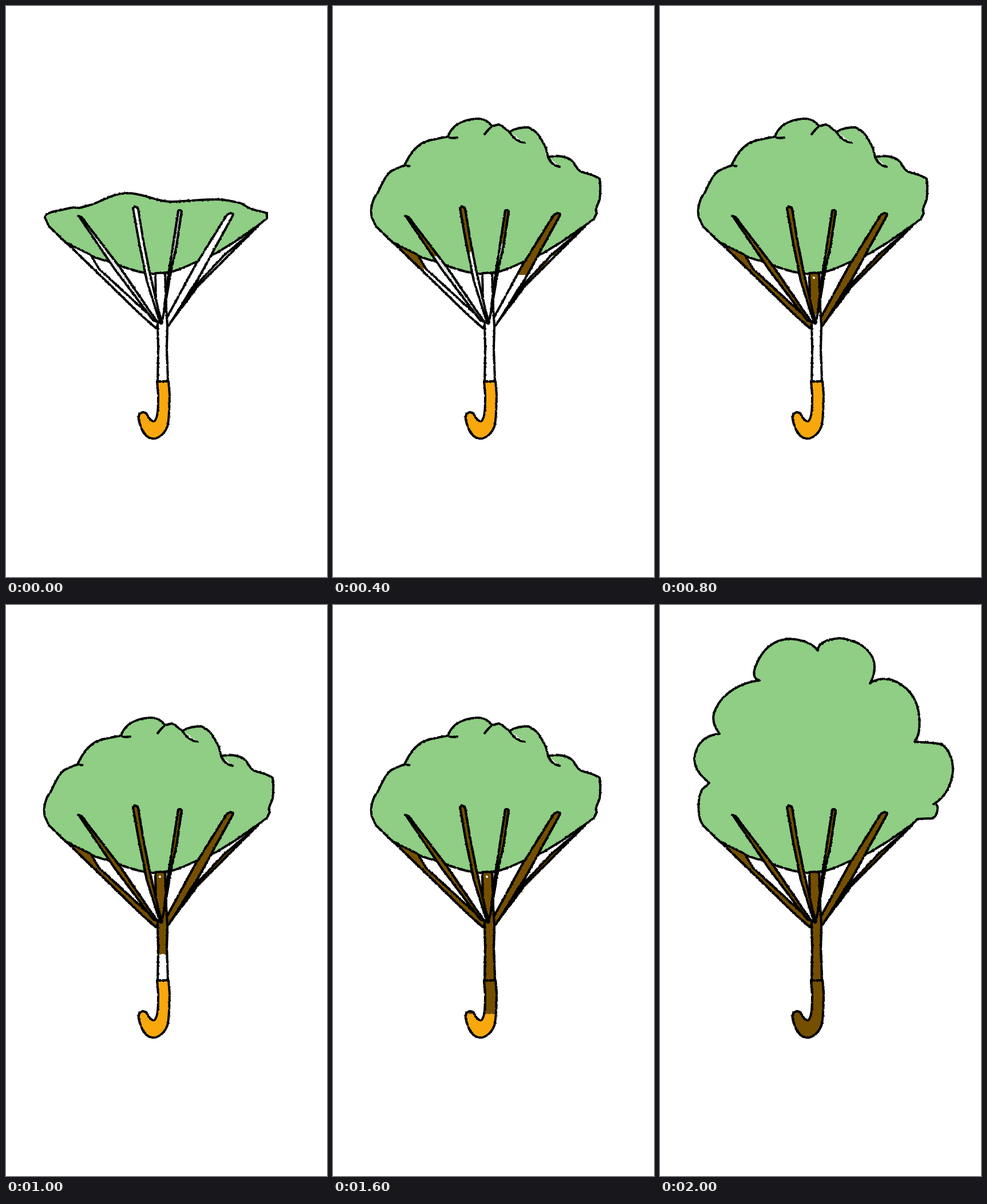
Recreate the animation shown at these times as an HTML page without scripts. Size 561 by 998 pixels, loop 2.4 s.

```html
<!DOCTYPE html>
<html lang="en">
<head>
<meta charset="utf-8">
<title>Umbrella tree</title>
<style>
  html, body { margin: 0; width: 100%; height: 100%; overflow: hidden; background: #fff; }
  svg { display: block; width: 100%; height: 100%; }
  .ink { stroke: #000; stroke-width: 4; stroke-linejoin: round; stroke-linecap: round; }
  .leaf { fill: #8fce84; }
  .plain { fill: #fff; --light: #e4e4e4; --dim: #bbb; }
  .bark { fill: #755003; --light: #755003; --dim: #755003; }
  .light { fill: var(--light); }
  .dim { fill: var(--dim); }
  .grip { fill: #f8a80c; }
</style>
</head>
<body>
<svg viewBox="0 0 561 998">
  <defs>
    <filter id="rough" filterUnits="userSpaceOnUse" x="0" y="0" width="561" height="998">
      <feTurbulence type="fractalNoise" baseFrequency=".3" numOctaves="1" seed="4"/>
      <feDisplacementMap in="SourceGraphic" scale="3" xChannelSelector="R" yChannelSelector="G"/>
    </filter>

    <g id="frame">
      <path d="M261 467 L278 466 L280 530 L272 553 L262 515Z"/>
      <path d="M106 414 L148 435 L163 460 L245 535 L267 554 L262 563 L238 542Z"/>
      <path class="light" d="M127 367 L132 369 L200 458 L264 552 L257 549 L190 460Z"/>
      <path d="M440 385 L420 405 L335 490 L290 550 L330 490 L382 435 L425 399Z"/>
      <path d="M392 362 Q398 362 396 367 L345 460 L330 487 L282 562 L281 545 L330 455 L386 365Z"/>
      <path class="dim" d="M301 358 Q304 355 307 359 L298 420 L290 455 L276 535 L283 475 L290 430Z"/>
      <path d="M222 354 Q226 347 231 355 L240 410 L252 470 L271 551 L268 550 L246 480 L232 410Z"/>
      <path d="M265 553 L272 555 L276 535 L280 527 L282 560 L281 600 L283 656 L265 656 L266 600Z"/>
      <path fill="#000" stroke="none" d="M345 462 L330 494 L298 534 L320 497Z M285 450 L292 447 L279 522 L275 522Z"/>
    </g>

    <path id="handle" d="M264 656 L284 656 L286 680 C285 700 286 720 282 735 C276 750 265 757 255 756
      C242 754 236 740 232 723 C230 713 238 707 245 712 C250 720 254 728 260 725 C266 718 266 700 266 680Z"/>

    <!-- The brown spreads downwards from the rib tips to the handle. -->
    <clipPath id="grown">
      <path>
        <animate attributeName="d" dur="2.4s" repeatCount="indefinite" calcMode="discrete"
          keyTimes="0;.16666;.25;.33333;.41666;.5;.66666;.75"
          values="M0 0Z;
            M0 0H561V436H380L365 470H325L310 416H290L255 430H220L200 437H165L160 460H0Z;
            M0 0H561V500H281V460H259V500H0Z;
            M0 0H561V566H283L279 530L272 540L270 552L264 556L262 570H0Z;
            M0 0H561V610H0Z;
            M0 0H561V669H0Z;
            M0 0H561V715H0Z;
            M0 0H561V998H0Z"/>
      </path>
    </clipPath>
  </defs>

  <g class="ink" filter="url(#rough)">
    <path class="leaf">
      <animate attributeName="d" dur="2.4s" repeatCount="indefinite" calcMode="discrete"
        keyTimes="0;.08333;.16666;.83333"
        values="M456 371L440 384L400 412L367 432L333 447C312 457 292 466 270 468C250 470 228 464 208 457L178 446C150 440 125 425 105 414L75 385L68 370
            L70 364L80 360L117 352L128 353L150 347C170 340 185 328 213 327C240 327 262 342 287 342C320 342 360 335 382 339C400 342 412 344 418 349C430 358 445 358 456 362Z;
          M456 371L440 384L400 412L367 432L333 447C312 457 292 466 270 468C250 470 228 464 208 457L178 446C150 440 125 425 105 414L75 385L68 370
            C67 345 85 335 100 325C115 315 135 308 147 312L150 323C160 306 180 299 190 299C208 299 220 306 224 313C230 300 245 296 255 297C268 299 274 304 279 309
            C290 302 298 300 304 300C311 304 318 310 323 315C335 306 350 304 358 306C372 310 378 315 382 320C400 318 420 332 427 345C440 350 450 352 457 358Z
            M279 309L282 319M323 315L334 323M382 320L389 335M224 313L225 317;
          M456 372L440 384L400 412L367 432L333 447C312 457 292 466 270 468C250 470 228 464 208 457L178 446C150 440 125 425 105 414L75 385L68 370
            C64 355 70 335 78 327C88 305 95 290 107 286C115 282 120 280 125 279C135 255 150 240 165 236C180 231 195 230 201 228C208 208 225 199 250 197C265 196 272 203 278 210
            L290 207C298 211 305 218 308 220C318 214 330 212 341 212C355 217 362 228 372 248L376 264C395 260 410 264 417 270C427 280 425 286 435 290C450 295 458 296 466 302
            C468 315 467 330 466 338C462 350 457 355 461 362Z
            M125 279L134 280M201 229Q207 232 217 230M278 210Q270 217 265 224M308 220Q320 238 335 239M376 264Q381 278 396 281;
          M450 374L440 384L400 412L367 432L333 447C312 457 292 466 270 468C250 470 228 464 208 457L178 446C150 440 125 425 105 414L75 385L70 375
            C66 360 66 335 74 322L86 311C70 298 60 285 60 268C63 245 75 228 104 225C92 210 90 195 98 180C110 155 140 135 174 132C163 130 162 118 168 105
            C180 75 200 60 228 59C250 61 268 68 276 80C275 68 290 60 313 58C325 58 330 62 345 66C362 75 375 90 375 108C375 120 371 130 367 137
            C378 128 395 128 405 131C430 140 450 160 453 195C455 215 452 230 445 239C465 241 480 240 493 244C508 255 512 275 512 290C509 315 500 335 478 348
            C484 347 486 352 485 358C483 372 476 374 470 373Z"/>
    </path>
    <use href="#frame" class="plain"/>
    <use href="#handle" class="grip"/>
    <g class="bark" clip-path="url(#grown)">
      <use href="#frame"/>
      <use href="#handle"/>
    </g>
    <circle cx="269" cy="475" r="2" fill="#fff" stroke="none">
      <animate attributeName="visibility" dur="2.4s" repeatCount="indefinite" calcMode="discrete"
        keyTimes="0;.33333;.83333" values="hidden;visible;hidden"/>
    </circle>
  </g>
</svg>
</body>
</html>
```
